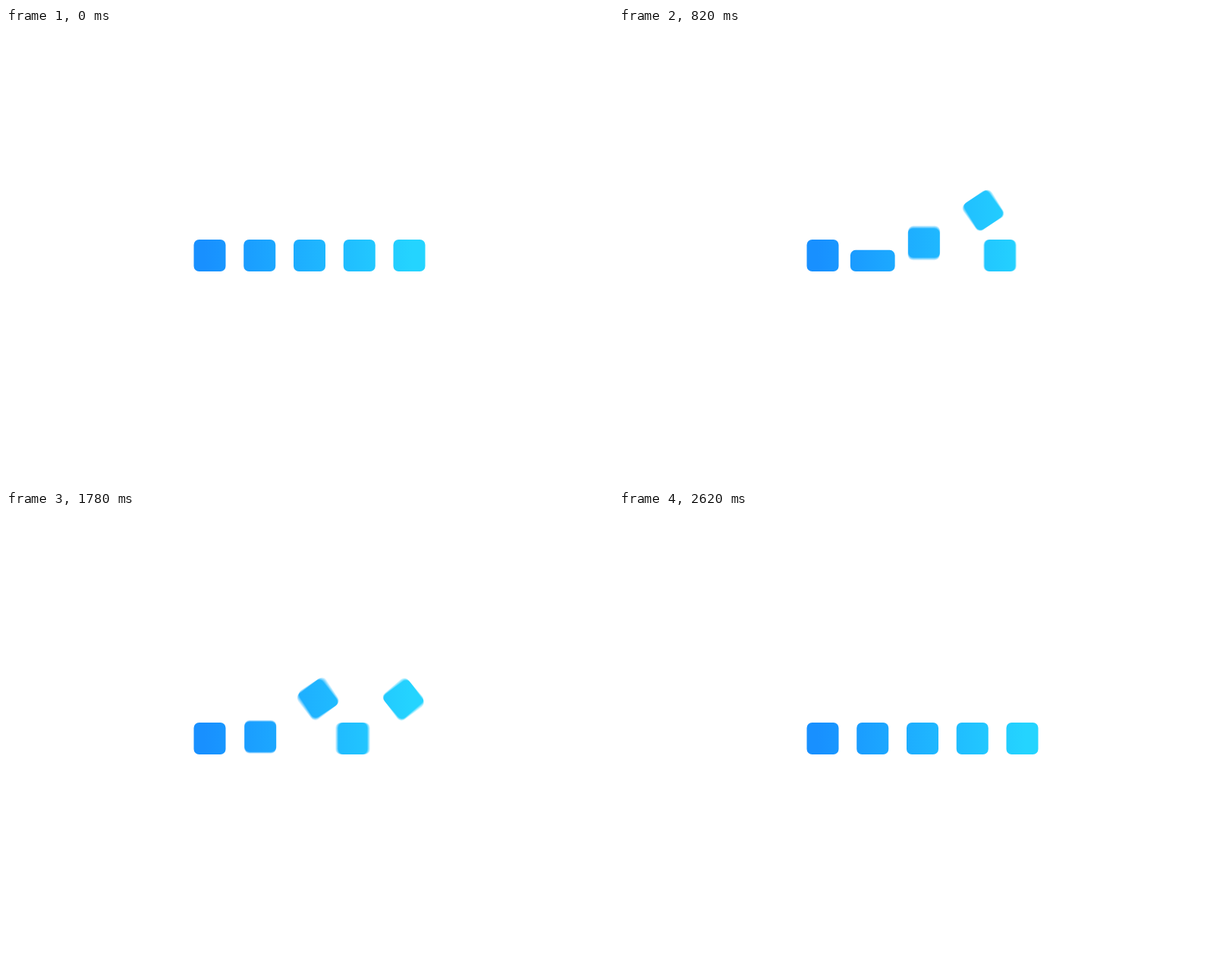
Recreate the animation shown at these times as an HTML page with a canvas. Size 800 px wide and 600 px high, loop 2640 ms.

```html
<!DOCTYPE html>
<html lang="en">
<head>
<meta charset="utf-8">
<title>Hopping squares loader</title>
<style>
  html, body { margin: 0; width: 100%; height: 100%; overflow: hidden; background: #fff; }
  canvas { display: block; }
</style>
</head>
<body>
<canvas id="stage" width="800" height="600"></canvas>
<script>
const ctx = document.getElementById('stage').getContext('2d');

const HALF = 1320;           // one pass; the second pass is mirrored
const RUN = 1150;            // time the sliding square needs
const SIZE = 42, RADIUS = 7, FLOOR = 321;
const GAP = 65.75, LEFT = 400 - 2 * GAP;
const PEAKS = [372, 532, 647, 765];   // when each hopper is highest
const SHUTTER = 10, SAMPLES = 5;      // motion blur

const paint = ctx.createLinearGradient(262, 0, 536, 0);
paint.addColorStop(0, '#1890ff');
paint.addColorStop(1, '#24d4ff');

const clamp = v => Math.min(1, Math.max(0, v));
const smooth = v => v * v * (3 - 2 * v);

// Ease with handles (a, 0) and (b, 1)
function ease(x, a, b) {
  let lo = 0, hi = 1;
  for (let i = 0; i < 24; i++) {
    const s = (lo + hi) / 2, r = 1 - s;
    if (3 * a * s * r * r + 3 * b * s * s * r + s * s * s < x) lo = s; else hi = s;
  }
  return smooth(lo);
}

// Smooth curve through [time, value] points
function curve(points, endSlope = 0) {
  const last = points.length - 1;
  const slope = i => i === 0 ? 0 : i === last ? endSlope :
    (points[i + 1][1] - points[i - 1][1]) / (points[i + 1][0] - points[i - 1][0]);
  return t => {
    if (t <= points[0][0]) return points[0][1];
    if (t >= points[last][0]) return points[last][1];
    let i = 0;
    while (t > points[i + 1][0]) i++;
    const [t0, v0] = points[i], [t1, v1] = points[i + 1];
    const h = t1 - t0, u = (t - t0) / h, r = 1 - u;
    return v0 * (1 + 2 * u) * r * r + v1 * (3 - 2 * u) * u * u +
      h * u * r * (slope(i) * r - slope(i + 1) * u);
  };
}

// Hop curves, with time counted from the peak
const travel = curve([[-205, 0], [-187, .014], [-145, .027], [-72, .167], [-27, .43],
  [55, .777], [88, .882], [173, .97], [210, 1]]);
const lift = curve([[-205, 0], [-187, 2], [-145, 15.8], [-72, 52], [-27, 64],
  [0, 65.5], [55, 59.7], [88, 52], [173, 17], [208, 0]], -.48);
const turn = d => -Math.PI * clamp((d + 172) / 332);

function squash(d) {
  if (d < 288) return Math.sin(clamp((d - 209) / 79) * Math.PI / 2);
  return 1 - smooth(clamp((d - 288) / 120));
}

function box(x, up, angle, w, h) {
  ctx.save();
  ctx.translate(x, FLOOR - up - h / 2);
  ctx.rotate(angle);
  ctx.beginPath();
  ctx.roundRect(-w / 2, -h / 2, w, h, RADIUS);
  ctx.fill();
  ctx.restore();
}

function pose(time) {
  const t = (time + 2 * HALF) % (2 * HALF);
  const u = t % HALF;
  ctx.save();
  if (t >= HALF) {
    ctx.translate(800, 0);
    ctx.scale(-1, 1);
  }
  box(LEFT + 4 * GAP * ease(clamp(u / RUN), .59, .4), 0, 0, SIZE, SIZE);
  PEAKS.forEach((peak, i) => {
    const d = u - peak, q = squash(d);
    box(LEFT + GAP * (i + 1 - travel(d)), lift(d), turn(d),
      SIZE * (1 + .4 * q), SIZE * (1 - .33 * q));
  });
  ctx.restore();
}

function draw() {
  const now = performance.now();
  ctx.globalCompositeOperation = 'source-over';
  ctx.clearRect(0, 0, 800, 600);

  ctx.globalCompositeOperation = 'lighter';
  ctx.globalAlpha = 1 / SAMPLES;
  ctx.fillStyle = '#000';
  for (let i = 0; i < SAMPLES; i++) pose(now + SHUTTER * ((i + .5) / SAMPLES - .5));

  // Colour depends only on the place on the stage
  ctx.globalCompositeOperation = 'source-in';
  ctx.globalAlpha = 1;
  ctx.fillStyle = paint;
  ctx.fillRect(0, 0, 800, 600);
  requestAnimationFrame(draw);
}
draw();
</script>
</body>
</html>
```
